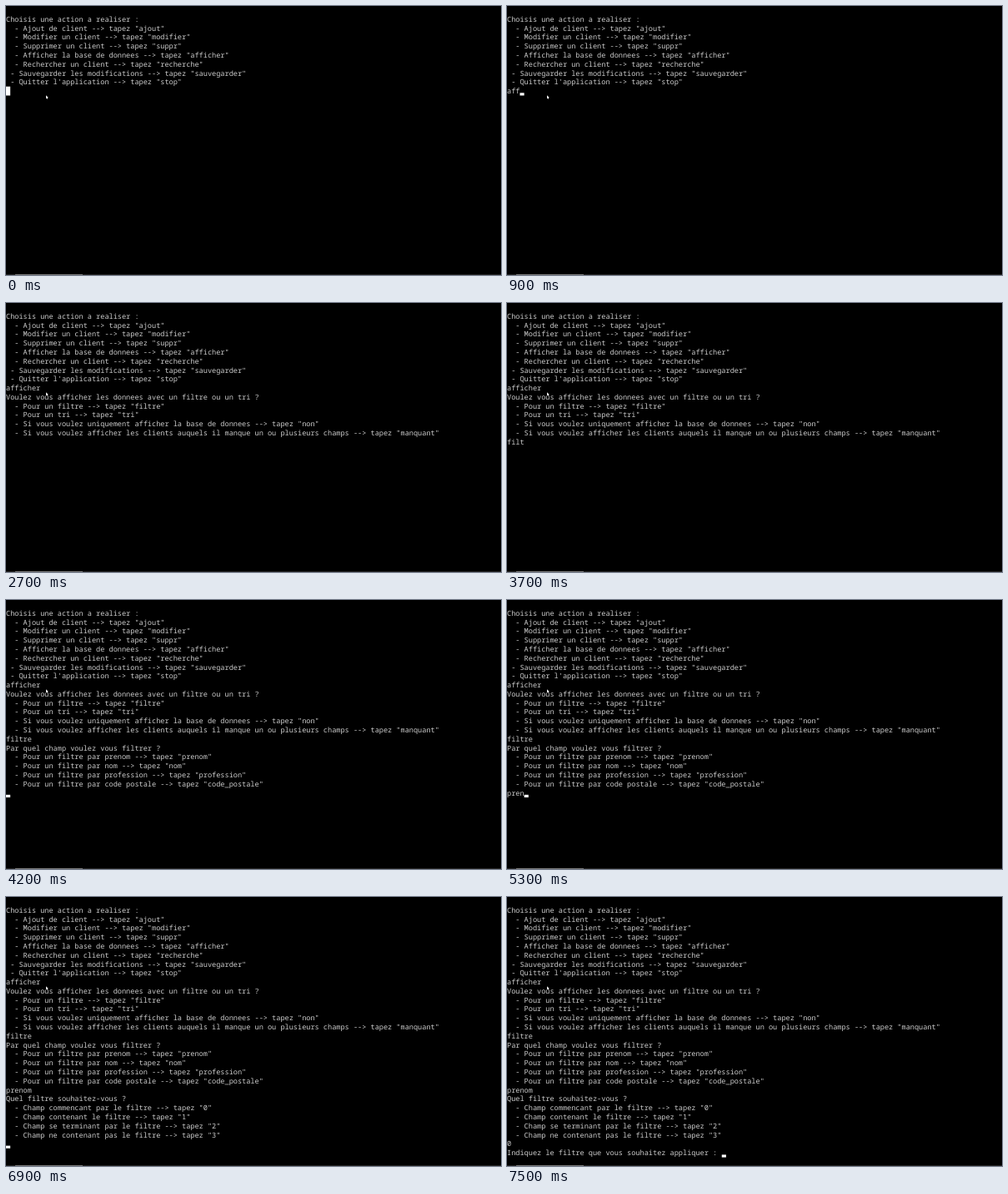
An HTML page with a canvas that plays this animation: 594 px wide and 323 px high, repeating every 8000 ms.

```html
<!DOCTYPE html>
<html lang="fr">
<head>
<meta charset="utf-8">
<style>
  html, body { margin: 0; overflow: hidden; background: #000; }
  canvas { display: block; }
</style>
</head>
<body>
<canvas id="stage" width="594" height="323"></canvas>
<script>
const LOOP = 8000, CELL = 5.155, LINE = 10.796, TOP = 10.33;
const ctx = document.getElementById('stage').getContext('2d');

const option = (label, command, indent = 2) =>
  `${' '.repeat(indent)}- ${label} --> tapez "${command}"\n`;

const mainMenu = 'Choisis une action a realiser :\n' +
  option('Ajout de client', 'ajout') +
  option('Modifier un client', 'modifier') +
  option('Supprimer un client', 'suppr') +
  option('Afficher la base de donnees', 'afficher') +
  option('Rechercher un client', 'recherche') +
  option('Sauvegarder les modifications', 'sauvegarder', 1) +
  option("Quitter l'application", 'stop', 1);

const displayMenu = 'Voulez vous afficher les donnees avec un filtre ou un tri ?\n' +
  option('Pour un filtre', 'filtre') +
  option('Pour un tri', 'tri') +
  option('Si vous voulez uniquement afficher la base de donnees', 'non') +
  option('Si vous voulez afficher les clients auquels il manque un ou plusieurs champs', 'manquant');

const fieldMenu = 'Par quel champ voulez vous filtrer ?\n' +
  option('Pour un filtre par prenom', 'prenom') +
  option('Pour un filtre par nom', 'nom') +
  option('Pour un filtre par profession', 'profession') +
  option('Pour un filtre par code postale', 'code_postale');

const filterMenu = 'Quel filtre souhaitez-vous ?\n' +
  option('Champ commencant par le filtre', '0') +
  option('Champ contenant le filtre', '1') +
  option('Champ se terminant par le filtre', '2') +
  option('Champ ne contenant pas le filtre', '3');

// [time, text added, cursor hidden]
const events = [
  [0, mainMenu],
  [300, 'a'], [400, 'f'], [600, '', true], [900, 'f'], [1100, 'ic'],
  [1300, 'h'], [1400, 'e'], [1500, 'r'], [1600, '', true], [1700, '\n'],
  [1800, displayMenu, true], [1900, ''], [2700, '', true], [3200, ''],
  [3500, 'f'], [3600, 'il'], [3700, 't', true], [3900, 'r'], [4100, 'e'],
  [4200, '\n' + fieldMenu], [4800, '', true],
  [5000, 'p'], [5100, 'r'], [5200, 'e'], [5300, 'n'], [5400, 'om'],
  [5700, '\n' + filterMenu], [6400, '', true], [6900, ''], [7000, '0'],
  [7500, '\nIndiquez le filtre que vous souhaitez appliquer : ']
];

function rect(color, x, y, w, h) {
  ctx.fillStyle = color;
  ctx.fillRect(x, y, w, h);
}

function drawPointer() {
  ctx.fillStyle = '#fff';
  ctx.beginPath();
  ctx.moveTo(48, 107.2);
  ctx.lineTo(50.8, 110);
  ctx.lineTo(49.8, 110.2);
  ctx.lineTo(50, 111.4);
  ctx.lineTo(49.2, 111.4);
  ctx.lineTo(48, 110.6);
  ctx.fill();
}

function draw(now) {
  const time = now % LOOP;
  const past = events.filter(([start]) => start <= time);
  const lines = past.map(([, text]) => text).join('').split('\n');
  const hidden = past[past.length - 1][2];

  rect('#000', 0, 0, 594, 323);
  rect('#222', 0, 322, 594, 1);
  rect('#777', 11, 322, 81, 1);

  ctx.font = '8.592px "Noto Sans Mono", monospace';
  ctx.textRendering = 'geometricPrecision';
  ctx.fillStyle = '#ccc';
  lines.forEach((line, row) => ctx.fillText(line, 0, TOP + row * LINE + 8.4));

  if (!hidden) {
    const row = lines.length - 1;
    const height = time < 300 ? LINE : 3.2;
    rect('#fff', lines[row].length * CELL, TOP + (row + 1) * LINE - height, CELL, height);
  }
  drawPointer();
  requestAnimationFrame(() => draw(performance.now()));
}
draw(0);
</script>
</body>
</html>
```
